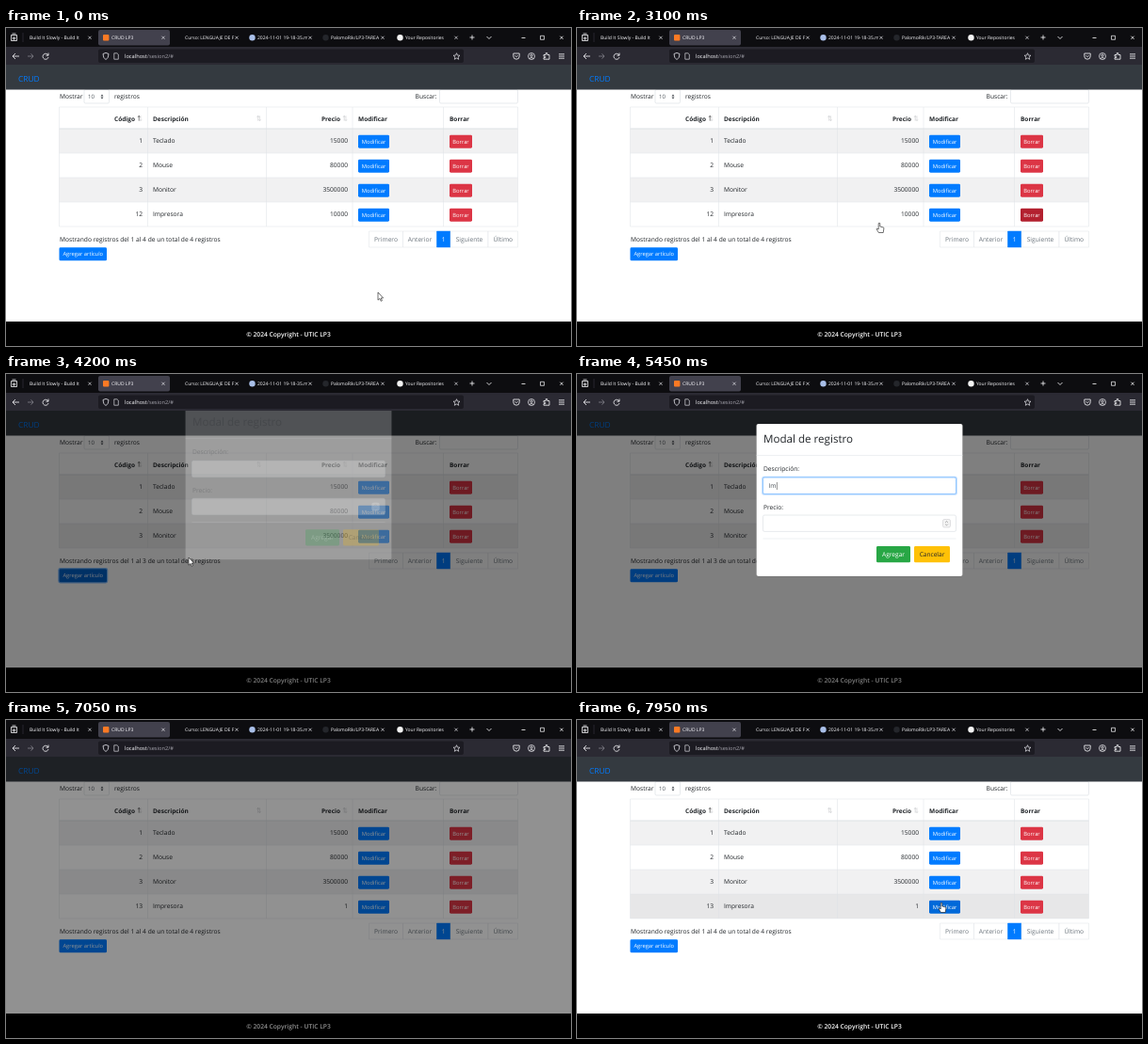
An HTML page with a canvas that plays this animation: 600 by 338 pixels, repeating every 8 s.

```html
<!DOCTYPE html>
<html lang="es">
<head>
<meta charset="utf-8">
<title>CRUD LP3</title>
<style>
  html, body { margin: 0; width: 100%; height: 100%; overflow: hidden; background: #fff; }
  canvas { display: block; width: 100vw; height: 100vh; }
</style>
</head>
<body>
<canvas id="stage"></canvas>
<script>
const canvas = document.getElementById('stage');
const ctx = canvas.getContext('2d');
const LOOP = 8000, STEP = 50;
const INK = '#212529', BLUE = '#007bff', RED = '#dc3545', LINE = '#dee2e6', MUTED = '#6c757d';

const clamp = v => Math.max(0, Math.min(1, v));
const ramp = (t, start, length) => clamp((t - start) / length);
const easeOut = v => 1 - (1 - v) ** 1.7;
const between = (t, a, b) => t >= a && t < b;

// ---------- drawing helpers ----------
function box(x, y, w, h, fill, stroke, r = 0, lineWidth = 0.5) {
  ctx.beginPath();
  ctx.roundRect(x, y, w, h, r);
  if (fill) { ctx.fillStyle = fill; ctx.fill(); }
  if (stroke) { ctx.strokeStyle = stroke; ctx.lineWidth = lineWidth; ctx.stroke(); }
}

function text(str, x, y, size = 6.65, color = INK, align = 'left', weight = 400) {
  ctx.font = `${weight} ${size}px "Open Sans", "Noto Sans", sans-serif`;
  ctx.textAlign = align;
  ctx.fillStyle = color;
  ctx.fillText(str, x, y + size * 0.34);
  return ctx.measureText(str).width;
}

function icon(d, x, y, color = '#fbfbfe', lineWidth = 0.8, fill) {
  const path = new Path2D(d);
  ctx.save();
  ctx.translate(x, y);
  if (fill) { ctx.fillStyle = fill; ctx.fill(path); }
  ctx.strokeStyle = color;
  ctx.lineWidth = lineWidth;
  ctx.lineJoin = 'round';
  ctx.stroke(path);
  ctx.restore();
}

function dot(x, y, r, color) {
  ctx.beginPath();
  ctx.arc(x, y, r, 0, 7);
  ctx.fillStyle = color;
  ctx.fill();
}

function button(label, x, y, w, h, fill, { color = '#fff', size = 5.8, ring } = {}) {
  if (ring) box(x - 1.2, y - 1.2, w + 2.4, h + 2.4, ring, null, 2.4);
  box(x, y, w, h, fill, null, 1.4);
  text(label, x + w / 2, y + h / 2 + 0.2, size, color, 'center');
}

// ---------- pointer ----------
// time, x, y of the tip, shape until the next key
const pointerKeys = [
  [0, 395, 281, 'arrow'], [400, 395, 281, 'arrow'], [1000, 440, 246, 'arrow'],
  [1500, 477, 199, 'hand'], [2250, 477, 199, 'arrow'], [2650, 334, 102, 'hand'],
  [2850, 334, 102, 'hand'], [3100, 321, 207, 'hand'], [3150, 318, 207, 'arrow'],
  [3750, 85, 213, 'hand'], [4050, 85, 213, 'arrow'], [4200, 194, 195, 'arrow'],
  [4650, 290, 118, 'beam'], [5100, 290, 118, 'none'], [7200, 290, 118, 'arrow'],
  [7650, 387, 194, 'hand'], [LOOP, 387, 194, 'hand']
];

function pointerAt(t) {
  const i = pointerKeys.findIndex(key => key[0] > t);
  const [t0, x0, y0, shape] = pointerKeys[i - 1];
  const [t1, x1, y1] = pointerKeys[i];
  const k = (t - t0) / (t1 - t0), s = k * k * (3 - 2 * k);
  return { x: x0 + (x1 - x0) * s, y: y0 + (y1 - y0) * s, shape };
}

function drawPointer({ x, y, shape }) {
  if (shape === 'arrow') icon('M0 0V8.2L1.9 6.5 3.2 9.3 4.4 8.7 3.2 6H5.6Z', x, y, '#111', 0.6, '#fff');
  if (shape === 'hand') icon('M-.8 .6Q0-.4 .8 .6V4L4.4 5Q5 5.2 4.9 6L4.2 10.5H-.6L-3 6.6Q-2.6 5.6-.8 7Z', x, y, '#111', 0.6, '#fff');
  if (shape === 'beam') icon('M-1.2-3.5H1.2M0-3.5V3.5M-1.2 3.5H1.2', x, y, '#222', 0.6);
}

// ---------- browser window ----------
const CROSS = 'M-1.6-1.6L1.6 1.6M1.6-1.6L-1.6 1.6';
const tabs = [
  // title, title x, close x, mark colour
  ['Build It Slowly - Build It', 25, 89],
  ['CRUD LP3', 112, 167, '#fb7a24'],
  ['Curso: LENGUAJE DE PR', 190, 245],
  ['2024-11-01 19-18-35.mp4', 267, 323, '#a9bfe8'],
  ['PalomoRik/LP3-TAREA', 345, 400, '#24262b'],
  ['Your Repositories', 424, 478, '#f4f4f4']
];

function drawBrowser() {
  box(0, 0, 600, 20, '#0d0d10');
  box(0, 20, 600, 19, '#2b2a33');
  box(98, 2, 76, 16.5, '#42414d', null, 2);
  icon('M-3-2.5H3V3.5H-3ZM-2-4H2M-1 0H1V2H-1Z', 8.5, 10);
  icon('M0-5V5', 18, 10, '#44434d', 0.5);
  tabs.forEach(([title, x, closeX, mark], i) => {
    if (i === 1) box(103, 7, 6.4, 6.4, mark, null, 1);
    else if (mark) dot(x - 5.5, 10.2, 3.2, mark);
    ctx.save();
    ctx.beginPath();
    ctx.rect(x, 0, closeX - x - 3, 20);
    ctx.clip();
    text(title, x, 10.3, 5, '#fbfbfe');
    ctx.restore();
    icon(CROSS, closeX, 10.3, '#e4e4ea', 0.7);
  });
  icon('M-2.5 0H2.5M0-2.5V2.5', 495, 10);
  icon('M-2.5-1L0 1.5 2.5-1', 513, 10);
  icon('M-2 0H2', 549.5, 10.5);
  icon('M-2-2H2V2H-2Z', 569.5, 10.3, '#fbfbfe', 0.7);
  icon(CROSS, 590, 10.3);

  icon('M3.5 0H-3.5M-.5-3L-3.5 0-.5 3', 10.5, 30);
  icon('M-3 0H3M.5-2.7L3 0 .5 2.7', 26, 30, '#85848c');
  icon('M2.8-1A3 3 0 1 0 3 1M3-3.5V-.8H.4', 42, 30);
  box(98, 22.5, 388, 14.5, '#1c1b22', null, 2);
  icon('M0-3.6L3-2.5Q3 2 0 3.6-3 2-3-2.5Z', 106, 30, '#e8e8ee');
  icon('M-2.2-3.2H1L2.3-2V3.2H-2.2Z', 117, 30, '#d8d8de', 0.7);
  const hostWidth = text('localhost', 126, 30.2, 5.7, '#fbfbfe');
  text('/sesion2/#', 126 + hostWidth, 30.2, 5.7, '#a5a4ad');
  icon('M0-3.5L1-1.1 3.5-1 1.6.7 2.2 3.1 0 1.8-2.2 3.1-1.6.7-3.5-1-1-1.1Z', 478.5, 30.2, '#e8e8ee', 0.7);
  icon('M-3.2-3H3.2V0A3.2 3.2 0 0 1-3.2 0ZM-1.5-.8L0 .7 1.5-.8', 542, 30);
  icon('M-3.5 0A3.5 3.5 0 1 0 3.5 0 3.5 3.5 0 1 0-3.5 0M-1.2-.8A1.2 1.2 0 1 0 1.2-.8 1.2 1.2 0 1 0-1.2-.8M-2.3 2.5Q0 .3 2.3 2.5', 558, 30, '#fbfbfe', 0.7);
  icon('M-3-1.5H-.8V-3.4H.8V-1.5H3V3.2H-3V1.6H-1.3V.2H-3Z', 574, 30);
  icon('M-3-2.2H3M-3 0H3M-3 2.2H3', 590, 30);
}

// ---------- page ----------
const TABLE_TOP = 84, BODY_TOP = 107, ROW = 26;
const columns = [56.5, 150.5, 276.5, 368, 464.5, 543.5];
const products = [['1', 'Teclado', '15000'], ['2', 'Mouse', '80000'], ['3', 'Monitor', '3500000']];

function rowsAt(t) {
  if (t < 3250) return [...products, ['12', 'Impresora', '10000']];
  return t < 7000 ? products : [...products, ['13', 'Impresora', '1']];
}

function sortMark(x, active) {
  icon('M0 2.7V-2.7M-1.1-1.2L0-2.7 1.1-1.2', x - 0.8, 96, active ? '#333' : '#c4c6c9', 0.6);
  icon('M0 2.7V-2.7M-1.1 1.2L0 2.7 1.1 1.2', x + 1, 96, '#c4c6c9', 0.5);
}

function drawTable(t, rows, pointer) {
  const bottom = BODY_TOP + ROW * rows.length;
  const free = !between(t, 2050, 3150) && !between(t, 4000, 7180) && pointer.shape !== 'none';
  const inside = free && pointer.x > columns[0] && pointer.x < columns[5];

  rows.forEach(([code, name, price], i) => {
    const top = BODY_TOP + ROW * i;
    const hovered = inside && pointer.y >= top && pointer.y < top + ROW;
    const over = (x, w) => hovered && pointer.x > x && pointer.x < x + w;
    if (hovered || i % 2 === 0) box(56.5, top, 487, ROW, hovered ? '#e7e7e8' : '#f1f1f2');
    text(code, 145, top + 13, 6.65, INK, 'right');
    text(name, 156, top + 13);
    text(price, 363, top + 13, 6.65, INK, 'right');
    button('Modificar', 374, top + 6.7, 33, 14, over(374, 33) ? '#0069d9' : BLUE);
    const pressed = i === 3 && between(t, 2050, 3250);
    button('Borrar', 471, top + 6.7, 24, 14, pressed ? '#b3202f' : over(471, 24) ? '#c82333' : RED);
  });

  for (const x of columns) box(x - 0.25, TABLE_TOP, 0.5, bottom - TABLE_TOP, LINE);
  box(56.5, TABLE_TOP - 0.25, 487, 0.5, LINE);
  box(56.5, BODY_TOP - 0.5, 487, 0.9, LINE);
  rows.forEach((_, i) => box(56.5, BODY_TOP + ROW * (i + 1) - 0.25, 487, 0.5, LINE));

  text('Código', 137, 96.7, 6.5, INK, 'right', 700);
  text('Descripción', 156, 96.7, 6.5, INK, 'left', 700);
  text('Precio', 355, 96.7, 6.5, INK, 'right', 700);
  text('Modificar', 374, 96.7, 6.5, INK, 'left', 700);
  text('Borrar', 471, 96.7, 6.5, INK, 'left', 700);
  sortMark(142, true);
  sortMark(268.5);
  sortMark(360);
  return bottom;
}

function drawPage(t, pointer) {
  const rows = rowsAt(t), n = rows.length;
  box(0, 39, 600, 299, '#fff');
  text('Mostrar', 57, 72.8);
  box(83, 65.5, 26.5, 14.5, '#fff', '#ced4da', 1.4);
  text('10', 87, 73, 6, '#495057');
  icon('M-1.1-.7L0-2.2 1.1-.7ZM-1.1.7L0 2.2 1.1.7Z', 102, 73, '#343a40', 0.3, '#343a40');
  text('registros', 115, 72.8);
  text('Buscar:', 457.5, 72.8, 6.65, INK, 'right');
  box(460.5, 65.5, 83, 14.5, '#fff', '#ced4da', 1.4);

  const bottom = drawTable(t, rows, pointer);
  text(`Mostrando registros del 1 al ${n} de un total de ${n} registros`, 57, bottom + 14.2);

  const pages = [['Primero', 385.5, 36], ['Anterior', 421.5, 36], ['1', 457.5, 14.5], ['Siguiente', 472, 40], ['Último', 512, 31.5]];
  for (const [label, x, w] of pages) {
    const active = label === '1';
    box(x, bottom + 5, w, 17, active ? BLUE : '#fff', active ? BLUE : LINE);
    text(label, x + w / 2, bottom + 14, 6.65, active ? '#fff' : MUTED, 'center');
  }

  const focused = between(t, 3950, 4700);
  button('Agregar artículo', 56.5, bottom + 22.3, 50.5, 14, focused ? '#0062cc' : BLUE,
    { size: 5.75, ring: focused && '#80bdff' });

  box(0, 39, 600, 26.5, '#343a40');
  text('CRUD', 13, 54, 8.4, BLUE);
  box(0, 312, 600, 26, '#000');
  text('© 2024 Copyright - UTIC LP3', 300, 326, 6.7, '#fff', 'center', 600);
}

// ---------- dialogs ----------
function field(y, value, focused) {
  if (focused) box(196.2, y - 1.3, 207.6, 20, 'rgba(0,123,255,.28)', null, 2.5);
  box(197.5, y, 205, 17.4, '#fff', focused ? '#80bdff' : '#ced4da', 1.6, focused ? 0.8 : 0.5);
  const width = text(value, 203.5, y + 9, 6.65, '#495057');
  if (focused) box(203.9 + width, y + 5, 0.5, 8, '#222');
}

function dialogFrame(title, height) {
  box(190.5, 53, 219, height, '#fff', 'rgba(0,0,0,.25)', 2);
  text(title, 198, 69.3, 11.6);
  box(190.5, 86.3, 219, 0.5, LINE);
}

function confirmDialog() {
  dialogFrame('¿Realmente quiere borrarlo?', 66);
  button('Confirmar', 314, 94, 40, 17, '#28a745', { size: 6.5 });
  button('Cancelar', 358, 94, 38, 17, '#28a745', { size: 6.5 });
}

function formDialog(t) {
  dialogFrame('Modal de registro', 162);
  const typed = 'Impresora'.slice(0, Math.max(0, Math.floor((t - 5190) / 110)));
  text('Descripción:', 198, 101, 6.65);
  field(110, typed, between(t, 4700, 6350));
  text('Precio:', 198, 141.3, 6.65);
  field(150, t >= 6450 ? '1' : '', between(t, 6350, 6600));
  box(388.5, 154.5, 8, 8.5, '#f3f3f3', '#c4c4c8', 1.6);
  icon('M-1.4-.8L0-2.2 1.4-.8M-1.4.8L0 2.2 1.4.8', 392.5, 158.7, '#666', 0.5);
  box(197.5, 174.8, 205, 0.5, LINE);
  button('Agregar', 318, 183, 36, 17.3, '#28a745', { size: 6.6, ring: t >= 6600 && '#b5dfbf' });
  button('Cancelar', 358, 183, 38, 17.3, '#ffc107', { size: 6.6, color: INK });
}

// The backdrop fades first, then the panel; closing runs the other way round.
const dialogs = [
  { open: 2080, close: 2780, draw: confirmDialog },
  { open: 4015, close: 6880, draw: formDialog }
];

function drawDialog({ open, close, draw }, t) {
  if (!between(t, open, close + 300)) return;
  const shade = Math.min(ramp(t, open, 150), 1 - ramp(t, close + 150, 150));
  box(0, 39, 600, 299, `rgba(0,0,0,${shade / 2})`);
  const alpha = Math.min(ramp(t, open + 150, 150), 1 - ramp(t, close, 150));
  if (alpha <= 0) return;
  const settled = Math.min(easeOut(ramp(t, open + 150, 300)), 1 - easeOut(ramp(t, close, 300)));
  // Blend over a copy so overlapping parts fade as one panel.
  const panel = ctx;
  panel.save();
  panel.beginPath();
  panel.rect(0, 39, 600, 299);
  panel.clip();
  panel.globalAlpha = alpha;
  panel.translate(0, -22 * (1 - settled));
  draw(t);
  panel.restore();
}

// ---------- loop ----------
function resize() {
  canvas.width = Math.round(innerWidth * devicePixelRatio);
  canvas.height = Math.round(innerHeight * devicePixelRatio);
}

function render() {
  const t = Math.floor((performance.now() % LOOP) / STEP) * STEP;
  const pointer = pointerAt(t);
  ctx.setTransform(canvas.width / 600, 0, 0, canvas.height / 338, 0, 0);
  ctx.textRendering = 'geometricPrecision';
  drawPage(t, pointer);
  dialogs.forEach(dialog => drawDialog(dialog, t));
  drawBrowser();
  drawPointer(pointer);
  requestAnimationFrame(render);
}

addEventListener('resize', resize);
resize();
render();
</script>
</body>
</html>
```
